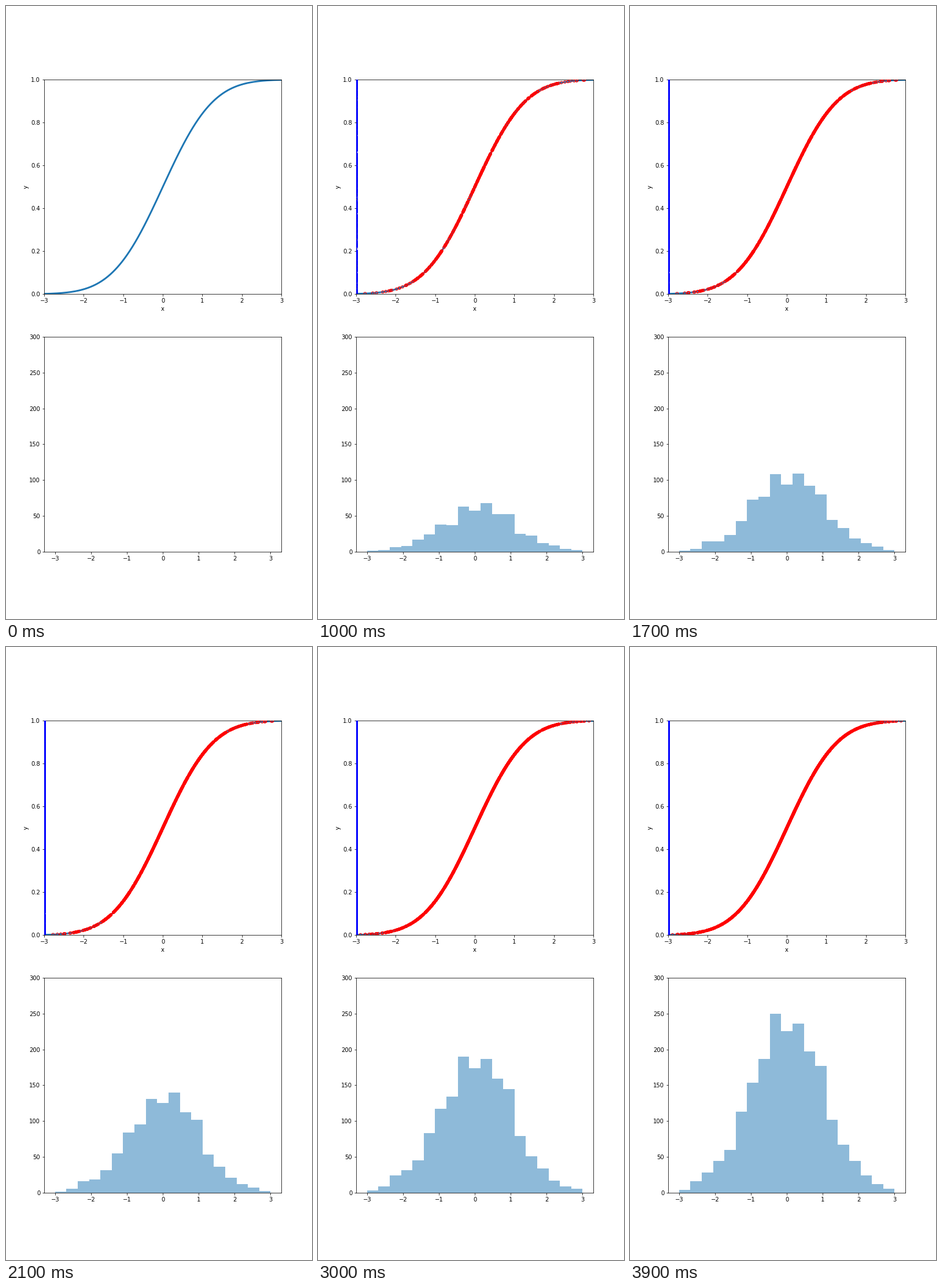
These frames come from a looping animation (529x1058 px, 4 s). A matplotlib script:

```python
import math

import matplotlib.pyplot as plt
import numpy as np
from matplotlib.animation import FuncAnimation

WIDTH, HEIGHT, DPI = 529, 1058, 72
FRAMES, INTERVAL = 40, 100
SAMPLES_PER_FRAME = 50

# Inverse transform sampling: uniform heights mapped through the normal CDF.
cdf = np.vectorize(lambda x: 0.5 * (1 + math.erf(x / math.sqrt(2))))
grid = np.linspace(-4, 4, 801)
grid_cdf = cdf(grid)
ys = np.random.default_rng(0).random(SAMPLES_PER_FRAME * (FRAMES - 1))
xs = np.interp(ys, grid_cdf, grid)
edges = np.linspace(-3, 3, 20)

fig, (top, bottom) = plt.subplots(
    2, 1, figsize=((WIDTH + 0.001) / DPI, (HEIGHT + 0.001) / DPI), dpi=DPI)

top.plot(grid, grid_cdf, color="C0", lw=3)


def add_rings(color):
    return top.scatter([], [], s=20, facecolors="none", edgecolors=color,
                       linewidths=1, zorder=3)


draws = add_rings("blue")
hits = add_rings("red")
top.set(xlim=(-3, 3), ylim=(0, 1), xlabel="x", ylabel="y")

bars = bottom.bar(edges[:-1], np.zeros(len(edges) - 1), np.diff(edges),
                  align="edge", color="C0", alpha=0.5)
bottom.set(xlim=(-3.3, 3.3), ylim=(0, 300))


def update(step):
    n = SAMPLES_PER_FRAME * step
    draws.set_offsets(np.column_stack([np.full(n, -3.0), ys[:n]]))
    hits.set_offsets(np.column_stack([xs[:n], ys[:n]]))
    counts, _ = np.histogram(xs[:n], edges)
    for bar, count in zip(bars, counts):
        bar.set_height(count)
    return draws, hits, *bars


anim = FuncAnimation(fig, update, frames=FRAMES, interval=INTERVAL,
                     repeat=True, repeat_delay=0)
plt.show()
```
